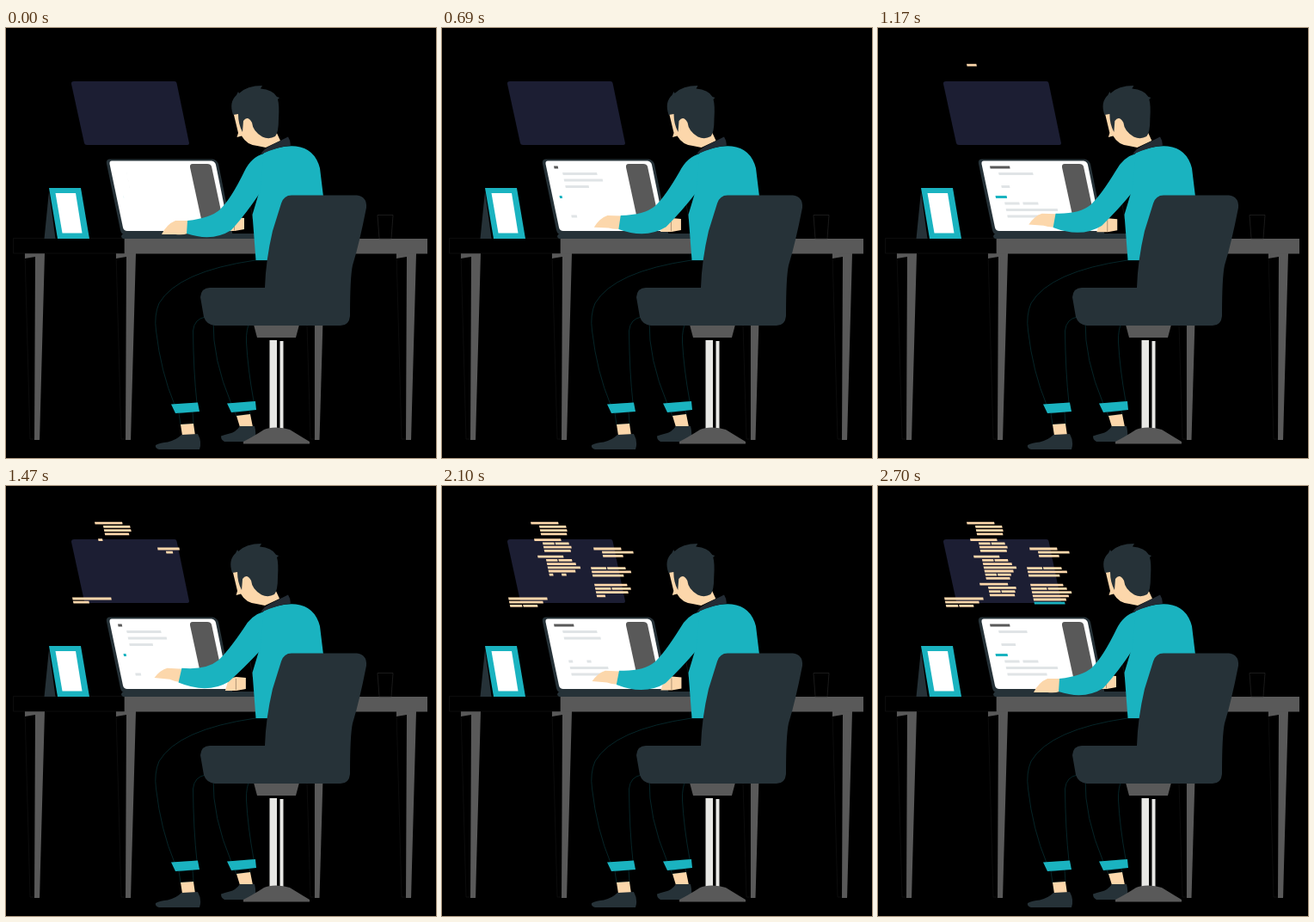
An HTML page for the animation above (2.73 s loop, 500 by 500 pixels).

```html
<!DOCTYPE html>
<html lang="en">
<head>
<meta charset="utf-8">
<title>Working at a desk</title>
<style>
html, body { margin: 0; height: 100%; overflow: hidden; background: #000; }
svg { display: block; width: 100vw; height: 100vh; }
.dark { fill: #263238; }
.grey { fill: #595959; }
.teal { fill: #1ab3c0; }
.skin { fill: #fcd7ab; }
.white { fill: #fff; }
.pale { fill: #e0e4e6; }
.edge { fill: #000; stroke: #151515; stroke-width: .6; }
.trousers { fill: #000; stroke: #0b3f43; stroke-width: .6; }
</style>
</head>
<body>
<svg viewBox="0 0 500 500">
  <path fill="#1c1e33" d="M79 62H196Q198 62 198.500 64L213 134Q213 136 211 136H94Q91.500 136 91 134L76 65Q75.500 62 79 62Z"/>
  <g id="code"></g>

  <!-- desk -->
  <g id="legs"></g>
  <path class="edge" d="M350 345H359V478H354Z"/>
  <path class="grey" d="M359 340H368.500L364.500 479H359Z"/>
  <path class="grey" d="M137 245H490V262.500H137Z"/>
  <path class="edge" d="M8.500 244.500H137.500V262H8.500Z"/>
  <path class="edge" style="stroke:#2c2c2c" d="M432 217.500H450L448 245H434Z"/>
  <path class="dark" d="M50 190L44.500 245H57.500Z"/>
  <path class="teal" d="M50 186H87L97 245H60Z"/>
  <path class="white" d="M57.500 192H81L88.500 238.500H65.500Z"/>

  <!-- laptop -->
  <path class="dark" d="M120 152.500H240Q245 153 247 158L263.500 240H138Q134 240 133 235L117 158Q116 153 120 152.500Z"/>
  <path class="white" d="M123 154.500H239Q243 155 244 159L259 233Q259 236 256 236H141Q137 236 136 232L120.500 158Q120 154.500 123 154.500Z"/>
  <path class="grey" d="M217 158H234Q238 158 239 161L252 222H227L214 162Q213.500 158 217 158Z"/>
  <g id="page"></g>
  <path class="dark" d="M134 243Q134 239 139 239H290V245H136Z"/>

  <!-- person -->
  <g id="farHand">
    <path class="skin" d="M255 238L258 228Q262 222 268 222L279 223V236L268 238Z"/>
    <path d="M267.500 224V237.500" stroke="#7a6650" stroke-width=".6"/>
  </g>
  <path d="M284 205L287 222" stroke="#222" stroke-width=".6"/>
  <path class="trousers" d="M241 340Q240 385 262 437L288 434Q281 395 279.500 365Q279 350 284 340Z"/>
  <path class="trousers" d="M305 270H290Q200 283 178 320Q172 334 174.500 352Q180 400 196 438L222 436Q218 400 217.500 352Q219 338 232 336H305Z"/>
  <path class="trousers" d="M201 448L217 446 218 460 203 461ZM266 447L283 445 284 449 268 451Z"/>
  <path class="teal" d="M192 437.500L223 435.500 225 446 197 448ZM257 436.500L290 434 291 444 262 447Z"/>
  <path class="skin" d="M203 461L218 460 220 474H205ZM268 451L284 449 287 464H272Z"/>
  <path class="dark" d="M204 473L223 472Q228 481 225 490H178Q173 488.500 174 485Q179 482 188 481.500Q198 479 204 473ZM272 463L289 463Q291 470 290 481H254Q250 479 250 474.500Q254 473 260 471.500Q267 470 272 463Z"/>
  <path class="teal" d="M300 145Q320 136 337 137.500Q359 140 365 163L369 196L340 220L306 270H290.500L286.500 217L294 192L290 160Z"/>
  <path class="skin" id="hand"/>
  <path class="teal" id="arm"/>
  <g id="head">
    <path class="skin" d="M264.500 99L270 122 268.500 127 274 125.500Q280 136 292 137L302 139 319 131 313 118 285 99Z"/>
    <path class="dark" d="M264 101Q259 86 268 78L270 74 271 76Q280 67 298 67L296 70.500Q310 71.500 315 80L318 81 316 83Q318 90 317 105Q317 122 313 126Q306 130 298 126.500Q287 120 286 110Q281 101 276 108L275 121Q270 112 270 100Z"/>
  </g>
  <path fill="#232c35" d="M296 147Q300 140 310 135.500L328 126.500Q331 131 331 136.500Q313 139 296 147Z"/>

  <!-- chair -->
  <path fill="#e8e8e5" d="M306.500 363H315V466H306.500ZM318.500 364H322.500V466H318.500Z"/>
  <path class="grey" d="M288 345H341L337 360H292ZM276 481Q286 476 300 467Q305 464.500 314 464.500Q323 464.500 330 467Q343 475 353 481V483.500H276Z"/>
  <path class="dark" d="M226 313Q227 302 237 302H301Q302 270 310 236L320 204Q323 194.500 332 194.500H408Q420 196 419 209Q411 250 403 276Q400 290 400 335Q399 346 389 346H243Q233 345 230 336Z"/>
</svg>
<script>
const LOOP = 2730, TYPING = 780, SWAY = LOOP / 3;
const SLANT = .21;
const byId = id => document.getElementById(id);
const clamp = v => Math.max(0, Math.min(1, v));
const wave = turns => Math.cos(2 * Math.PI * turns);

function addPath(parent, className, d = "") {
  const path = document.createElementNS("http://www.w3.org/2000/svg", "path");
  path.setAttribute("class", className);
  path.setAttribute("d", d);
  byId(parent).append(path);
  return path;
}

for (const x of [22, 128, 454]) {
  addPath("legs", "edge", `M${x} 262l6 216h11V262z`);
  addPath("legs", "grey", `M${x} 262h23l-6 217h-6l1-213-12 2z`);
}

// A heading with indented rows below it, following the slant of the screen.
function place(block, i, pitch) {
  return {
    x: block.x + SLANT * pitch * i + (i ? block.indent : 0),
    y: block.y + pitch * i
  };
}

// Pieces of a row all grow from their own left end.
function drawRow({ path, x, y, width, gap }, part) {
  const bar = (left, w) => `M${left} ${y - 1.4}h${w * part}l.6 2.8h${-w * part}z`;
  const first = width * .44;
  const d = gap ? bar(x, first) + bar(x + first + gap, width - first - gap) : bar(x, width);
  path.setAttribute("d", part > 0 ? d : "");
}

const codeBlocks = [
  { x: 103, y: 43.2, rows: 4, indent: 9, start: 1125 },
  { x: 107, y: 62.7, rows: 4, indent: 9, start: 1450 },
  { x: 111, y: 82.2, rows: 7, indent: 9, start: 1680 },
  { x: 118, y: 114.2, rows: 4, indent: 9, start: 2160 },
  { x: 77, y: 131, rows: 3, indent: 0, start: 1335 },
  { x: 176, y: 73, rows: 3, indent: 9, start: 1368 },
  { x: 173, y: 95.7, rows: 3, indent: 0, start: 1600 },
  { x: 177, y: 115.2, rows: 6, indent: 0, start: 1845 }
];
const code = [];
for (const block of codeBlocks) {
  for (let i = 0; i < block.rows; i++) {
    const n = code.length, last = i === block.rows - 1;
    const accent = last && block === codeBlocks.at(-1);
    const base = !block.indent ? 40 : i ? 32 : 27;
    code.push({
      ...place(block, i, 4.2),
      width: base + (last ? -5 : 2) + 4 * Math.cos(1.65 * n + .7),
      gap: n > 4 && n % 4 === 1 && !accent ? 1.2 : 0,
      start: block.start + 75 * i,
      path: addPath("code", accent ? "teal" : "skin")
    });
  }
}

const pageBlocks = [
  { x: 130, y: 162, indent: 8.5, widths: [23, 40, 45, 33], heading: "grey", peak: 400, lag: 165 },
  { x: 136.5, y: 196.5, indent: 9, widths: [14, 39, 60, 46], heading: "teal", peak: 200, lag: 63 }
];
const page = pageBlocks.flatMap(block => block.widths.map((width, i) => ({
  ...place(block, i, 7.5),
  width,
  gap: width === 39 ? 4 : 0,
  peak: block.peak + block.lag * i,
  path: addPath("page", i ? "pale" : block.heading)
})));

const poses = {
  arm: ["M300 146Q285 150 277 167Q262 198 249 211Q238 221 211 224L210 239Q240 249 262 235Q280 215 295 192Z",
        "M300 146Q285 150 276 166Q258 192 247 202Q232 214 204 211L200 228Q234 242 259 227Q279 209 295 192Z"],
  hand: ["M181 240Q187 228 197 224L212 224L211 239Q206 241 197 240Z",
         "M172 222Q179 213 187 211L205 212L201 227Q196 227 190 224Z"]
};

function blend([a, b], part) {
  const ends = b.match(/[\d.]+/g);
  let i = 0;
  return a.replace(/[\d.]+/g, n => (+n + (ends[i++] - n) * part).toFixed(2));
}

function draw(t) {
  const reach = clamp(.5 - .6 * wave(t / SWAY));
  for (const id in poses) byId(id).setAttribute("d", blend(poses[id], reach));
  byId("head").setAttribute("transform", `translate(${-reach})`);
  byId("farHand").setAttribute("transform", `translate(${2 * reach - 2} ${2 * reach - 2})`);

  for (const row of code) drawRow(row, clamp((t - row.start) / 130));
  for (const row of page) drawRow(row, clamp(.9 + wave((t - row.peak) / TYPING)) * clamp(t / 300));
}

const begin = performance.now();
function tick() {
  draw((performance.now() - begin) % LOOP);
  requestAnimationFrame(tick);
}
tick();
</script>
</body>
</html>
```
